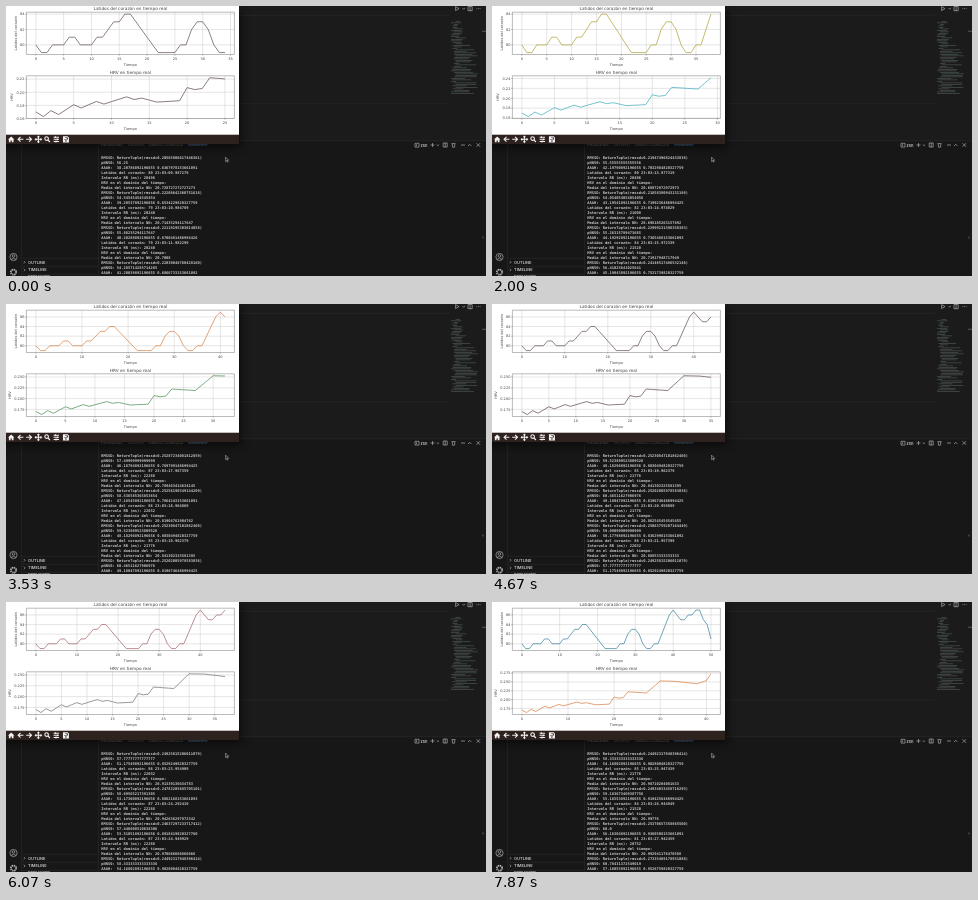
Animation, 480 px wide and 270 px high, one loop 8000 ms. Source, as an HTML page:

```html
<!DOCTYPE html>
<html lang="es">
<head>
<meta charset="utf-8">
<title>Latidos en tiempo real</title>
<style>
  html, body { margin: 0; width: 100%; height: 100%; overflow: hidden; background: #191919; }
  svg { display: block; width: 100vw; height: 100vh; }
  text { white-space: pre; }
  #plot text { font-family: "DejaVu Sans", sans-serif; font-size: 3.55px; fill: #444; text-anchor: middle; }
  #plot .title { font-size: 4.25px; }
  #plot .end { text-anchor: end; }
  #term text { font: bold 3.72px "DejaVu Sans Mono", monospace; fill: #c6c6c6; }
  .ui text { font: 600 4px Inter, sans-serif; fill: #c4c4c4; }
  .ui .tab { font-weight: 400; fill: #777; }
  .ui path, .ui circle { fill: none; stroke: #b4b4b4; stroke-width: .65; }
  .tools path { fill: none; stroke: #f2f2f2; stroke-width: 1.1; }
  .tools .solid { fill: #f2f2f2; stroke: none; }
  .rule { stroke: #2a2a2a; stroke-width: .6; }
</style>
</head>
<body>
<svg viewBox="0 0 480 270">
  <defs>
    <filter id="soft" x="-20%" y="-20%" width="140%" height="140%"><feGaussianBlur stdDeviation="5"/></filter>
  </defs>
  <rect width="480" height="270" fill="#1b1b1b"/>
  <rect y="135" width="480" height="135" fill="#171717"/>
  <g class="rule">
    <path d="M233 9.3H443M233 97.8H443M233 134.8H480M92.5 138V270M15.5 138V270"/>
    <path d="M16 252.3H92M16 260.3H92M16 268.3H92"/>
  </g>
  <g id="map"></g>
  <rect x="476" y="24.8" width="4" height=".8" fill="#666"/>
  <rect x="476" y="230.5" width="2" height="2" fill="#3a3a3a"/>

  <g class="ui">
    <path d="M449.6 .6V4.6L453 2.6ZM456.5 2l1.2 1.2L458.9 2M462 .5h4.2v4.2h-4.2zM464.1 .5v4.2"/>
    <path d="M470.5 2.6h4" stroke-dasharray=".8 .8"/>
    <text class="tab" x="95" y="140.2">PROBLEMS</text>
    <text class="tab" x="122" y="140.2">OUTPUT</text>
    <text class="tab" x="143" y="140.2">DEBUG CONSOLE</text>
    <text class="tab" x="181" y="140.2">TERMINAL</text>
    <path d="M409 137.3h4v3.8h-4zM410 138.4l1 .8-1 .8"/>
    <text x="414.5" y="140.6">zsh</text>
    <path d="M424.5 139h4M426.5 137v4M430.7 138.5l1.2 1.2 1.2-1.2M437.2 137h4v4h-4zM439.2 137v4"/>
    <path d="M445.5 137.6h4M446.2 137.8l.3 3.4h2l.3-3.4M455 139h4"/>
    <path d="M462 140l1.7-1.7 1.7 1.7M470.5 137.2l3.6 3.6M474.1 137.2l-3.6 3.6"/>
    <circle cx="7.5" cy="251" r="3.6"/><circle cx="7.5" cy="250" r="1.3"/>
    <path d="M5 253.5q2.5-2.6 5 0"/>
    <circle cx="7.5" cy="266.2" r="2.9" stroke-dasharray="1.4 .877" style="stroke-width:1.3"/>
    <circle cx="7.5" cy="266.2" r="2.2"/>
    <path d="M17.8 255l1.3 1.3-1.3 1.3M17.8 262.6l1.3 1.3-1.3 1.3"/>
    <text x="22" y="257.8">OUTLINE</text>
    <text x="22" y="265.3">TIMELINE</text>
    <text x="22" y="272.4">DEBUGGER</text>
  </g>
  <g id="term"></g>

  <rect x="-8" y="4" width="243" height="137" fill="#000" opacity=".6" filter="url(#soft)"/>
  <rect x="182" y="138.5" width="20" height=".6" fill="#1d3f60"/>
  <rect width="233" height="138" fill="#2e221f"/>
  <rect width="233" height="128.7" fill="#fff"/>
  <g id="plot"></g>
  <g class="tools" transform="translate(.2 .3)">
    <path class="solid" d="M1.8 133.3L5 130.2l3.2 3.1H7.3v2.7H5.6v-1.8H4.400v1.800H2.700v-2.700z"/>
    <path d="M17.2 133h-5.2M14.300 130.600L11.900 133l2.400 2.400"/>
    <path d="M20 133h5.200M22.900 130.600l2.400 2.400-2.400 2.400"/>
    <path d="M29.200 133h6M32.200 130v6M31.200 130.900l1-1 1 1M31.200 135.100l1 1 1-1M30.100 132l-1 1 1 1M34.300 132l1 1-1 1"/>
    <path d="M38.600 132.300a1.800 1.800 0 1 0 3.600 0a1.800 1.800 0 1 0-3.600 0M41.800 133.700l1.900 2"/>
    <path d="M47.400 130.900h5.400M47.400 133h5.400M47.400 135.200h5.400M49.200 130v1.800M51.200 132.100v1.800M49.800 134.300v1.800"/>
    <path d="M57.300 130.400h3.900l1 1v4.300h-4.900zM58.300 130.600v1.500h2.300M58.300 135.500v-1.800h2.800v1.800"/>
  </g>
  <path d="M219.6 151.200v4.300l1-.9.7 1.500.7-.3-.6-1.500h1.300z" fill="#111" stroke="#e6e6e6" stroke-width=".45"/>
</svg>
<script>
const LOOP = 8000, TICK = 1000 / 15;
const START = 34, BEATS = 16, LAG = 9;   // first beat shown, beats per loop, delay of the HRV series
const COLORS = ['#3f86a0', '#d9834a', '#52915a', '#b85458', '#685660',
                '#665250', '#a8686e', '#777777', '#b0a63c', '#45afbc'];

// Turning points of both curves: [beat, value].
const heartKeys = [[0, 80], [1, 79], [2, 79.4], [7, 80.8], [8, 80], [10, 80], [16, 84], [18, 83],
  [22, 79], [25, 79], [27, 80.2], [29, 83], [30, 83], [33, 79], [34, 79], [36, 80],
  [39, 86], [40, 87], [42, 85], [43, 85], [47, 87.4], [48, 85], [49, 84], [50, 81]];
const hrvKeys = [[0, .17], [1, .163], [2, .172], [3, .166], [5, .181], [6, .176], [8, .186],
  [9, .182], [12, .193], [13, .189], [14, .191], [16, .185], [19, .187], [20, .207], [21, .204],
  [22, .2056], [23, .222], [27, .2185], [30, .2528], [33, .252], [38, .2449], [40, .2537], [41, .2733]];

const $ = id => document.getElementById(id);
const noise = i => Math.abs(Math.sin(i * 12.9898) * 43758.5453) % 1;
const line = (d, color, width) => `<path d="${d}" fill="none" stroke="${color}" stroke-width="${width}" stroke-linejoin="round"/>`;
const label = (x, y, s, cls = '') => `<text x="${x}" y="${y}" class="${cls}">${s}</text>`;
const sideLabel = (x, y, s) => `<text transform="translate(${x} ${y}) rotate(-90)">${s}</text>`;

function interpolate(keys, i) {
  const k = Math.max(1, keys.findIndex(key => key[0] >= i));
  const [x0, y0] = keys[k - 1], [x1, y1] = keys[k];
  return y0 + (y1 - y0) * (i - x0) / (x1 - x0);
}

const series = (size, rule) => Array.from({ length: size }, (_, i) => rule(i));
const heart = series(START + BEATS + 1, i => Math.round(interpolate(heartKeys, i)));
const hrv = series(heart.length - LAG, i => interpolate(hrvKeys, i) + noise(i + 1) * 1e-4);

// Beats arrive evenly, apart from one stall that is caught up within two beats.
const stall = beat => beat < 45 ? 0 : Math.max(0, 1 - .66 * (beat - 45));
const elapsed = beat => 41.20039892196655 + .99751 * (beat - START) + stall(beat);
const logTime = beat => (elapsed(beat) - 42.13) * 500;
const plotTime = beat => logTime(beat) + 130;

function chart(data, top, bottom, yStep, digits) {
  const left = 20.4, right = 228.4, last = data.length - 1;
  const lo = Math.min(...data), hi = Math.max(...data), pad = (hi - lo) * .05;
  const px = i => left + (right - left) * (i / last + .05) / 1.1;
  const py = v => bottom - (bottom - top) * (v - lo + pad) / (hi - lo + 2 * pad);
  const xStep = last > 40 ? 10 : 5;
  let grid = '', ticks = '', out = '';
  for (let i = 0; px(i) <= right; i += xStep) {
    grid += `M${px(i)} ${top}V${bottom}`;
    ticks += `M${px(i)} ${bottom}v1.2`;
    out += label(px(i), bottom + 5.6, i);
  }
  for (let k = Math.ceil((lo - pad) / yStep - .01); k * yStep <= hi + pad; k++) {
    const y = py(k * yStep);
    grid += `M${left} ${y}H${right}`;
    ticks += `M${left} ${y}h-1.2`;
    out += label(left - 2, y + 1.3, (k * yStep).toFixed(digits), 'end');
  }
  const curve = 'M' + data.map((v, i) => `${px(i).toFixed(2)} ${py(v).toFixed(2)}`).join('L');
  return line(grid, '#c0c0c0', .4) + line(curve, COLORS[last % 10], .75) +
    line(`M${left} ${top}H${right}V${bottom}H${left}Z` + ticks, '#555', .4) + out +
    label(124.4, bottom + 11.2, 'Tiempo');
}

function drawPlot(beat) {
  const rates = heart.slice(0, beat + 1), vars = hrv.slice(0, beat + 1 - LAG);
  const wide = Math.max(...vars) > .25;
  $('plot').innerHTML =
    label(124.4, 3.5, 'Latidos del corazón en tiempo real', 'title') +
    chart(rates, 6.2, 48.5, 2, 0) + sideLabel(11.4, 27.3, 'Latidos del corazón') +
    label(124.4, 67.7, 'HRV en tiempo real', 'title') +
    chart(vars, 69.8, 112.5, wide ? .025 : .02, wide ? 3 : 2) + sideLabel(wide ? 5 : 7.4, 91, 'HRV');
}

function entry(beat) {
  const count = beat + 1, secs = elapsed(beat);
  const interval = rate => rate * 256 + 16;
  const mean = heart.slice(0, count).reduce((sum, rate) => sum + interval(rate), 0) / count / 1000;
  const over50 = Math.floor(17.55 + .72 * (beat - 31) + .6 * Math.cos((beat - 41.5) * Math.PI / 5));
  const share = over50 / count * 100;
  const clock = (secs - 29.2181).toFixed(6).padStart(9, '0');
  return [
    `Latidos del corazón: ${heart[beat]} 23:03:${clock}`,
    `Intervalo RR (ms): ${interval(heart[beat])}`,
    'HRV en el dominio del tiempo:',
    `Media del intervalo NN: ${mean}`,
    `RMSSD: ReturnTuple(rmssd=${hrv[beat - LAG].toPrecision(17)})`,
    `pNN50: ${Number.isInteger(share) ? share + '.0' : share}`,
    `AAAH:  ${secs.toPrecision(16)} ${(secs / 60).toPrecision(16)}`
  ];
}

function drawLog(beat) {
  const rows = [3, 2, 1, 0].flatMap(back => entry(beat - back)).slice(-24);
  $('term').innerHTML = rows.map((s, i) => label(95.2, 153.2 + i * 5, s)).join('');
}

function drawMinimap() {
  const tints = ['#5f7a68', '#707070', '#66786e'];
  let out = '';
  for (let row = 1; row < 50; row++) {
    const x = 445 + Math.floor(noise(row) * 4) * 1.5;
    const width = 4 + noise(row + 60) * (row < 16 ? 8 : 20);
    out += `<rect x="${x}" y="${13.5 + row * 1.5}" width="${width}" height=".7" fill="${tints[row % 3]}" opacity=".6"/>`;
  }
  $('map').innerHTML = out;
}

function beatAt(timeOf, t) {
  let beat = START;
  while (beat < START + BEATS && timeOf(beat + 1) <= t) beat++;
  return beat;
}

let shownPlot, shownLog;

function frame() {
  const now = performance.now() % LOOP;
  const t = Math.floor((now + 5) / TICK) * TICK;
  const plot = beatAt(plotTime, t), log = beatAt(logTime, t);
  if (plot !== shownPlot) drawPlot(shownPlot = plot);
  if (log !== shownLog) drawLog(shownLog = log);
  requestAnimationFrame(frame);
}

drawMinimap();
frame();
</script>
</body>
</html>
```
